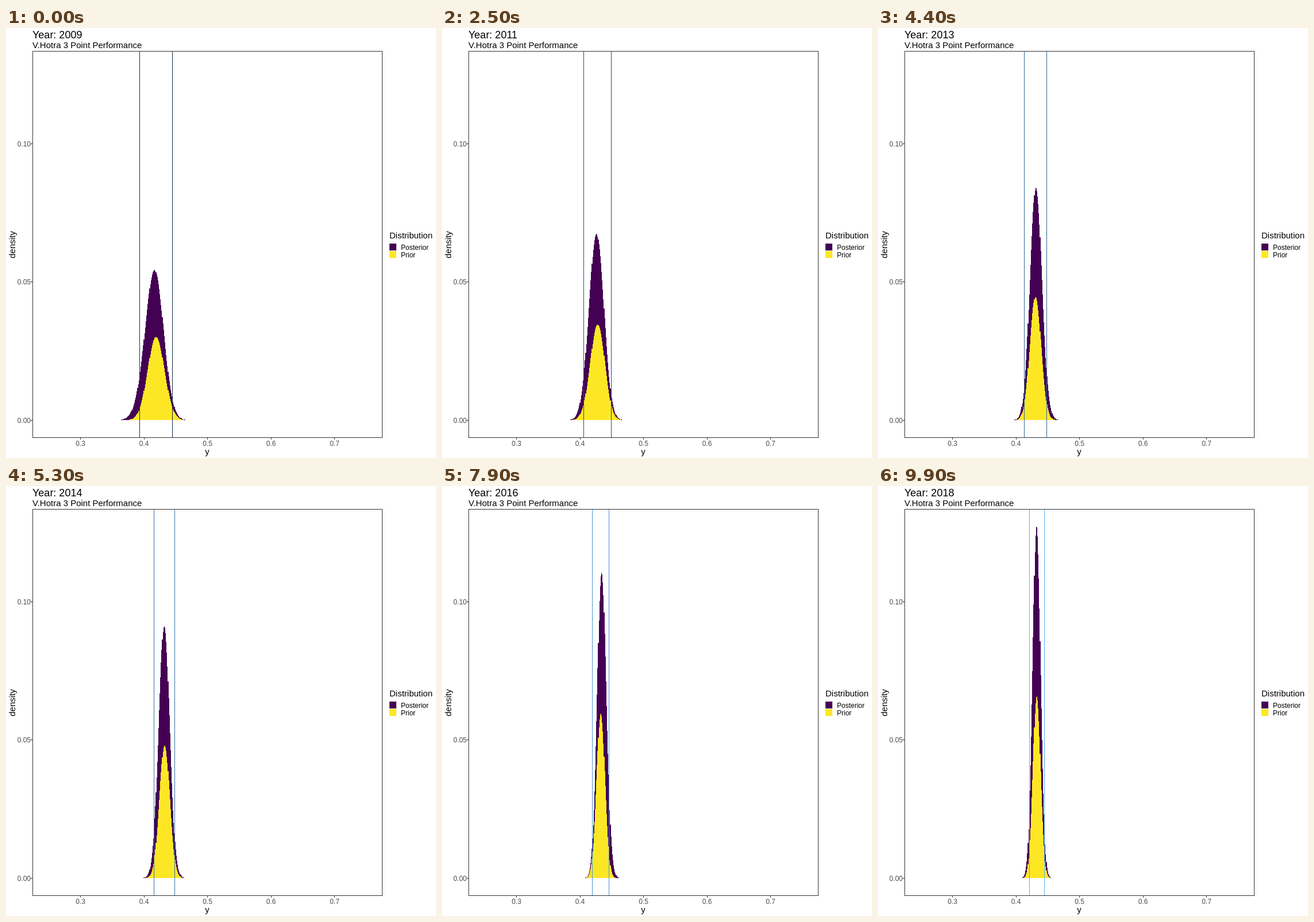
An HTML page that plays this animation: 748x748 px, repeating every 10000 ms.

```html
<!DOCTYPE html>
<html lang="en">
<head>
<meta charset="utf-8">
<title>Yearly shooting estimate</title>
<style>
  html, body { margin: 0; width: 100%; height: 100%; overflow: hidden; background: #fff; }
  svg { display: block; width: 100vw; height: 100vh; }
  text { font-family: "Liberation Sans", Arial, sans-serif; font-size: 15px; fill: #000; }
  .title { font-size: 18px; }
  .small { font-size: 12px; }
  .tick { font-size: 12px; fill: #4d4d4d; }
  .mid { text-anchor: middle; }
  .end { text-anchor: end; }
  .crisp { shape-rendering: crispEdges; }
</style>
</head>
<body>
<svg viewBox="0 0 748 748">
  <rect width="748" height="748" fill="#fff"/>
  <text class="title" id="year" x="46" y="18"></text>
  <text x="46" y="35">V.Hotra 3 Point Performance</text>

  <g class="crisp">
    <path id="posterior" fill="#440154"/>
    <path id="prior" fill="#fde725"/>
    <path id="interval" fill="none"/>
    <rect x="46.5" y="40.5" width="608" height="672" fill="none" stroke="#333"/>
    <path id="ticks" stroke="#333"/>
    <rect x="667" y="375" width="12" height="12" fill="#440154"/>
    <rect x="667" y="388" width="12" height="12" fill="#fde725"/>
  </g>

  <g id="labels"></g>
  <text class="mid" x="350" y="742">y</text>
  <text class="mid" transform="translate(16 377) rotate(-90)">density</text>
  <text x="667" y="366">Distribution</text>
  <text class="small" x="687" y="386">Posterior</text>
  <text class="small" x="687" y="399">Prior</text>
</svg>
<script>
const FRAME_MS = 100, FRAMES = 100, STEPS_PER_YEAR = 11, FIRST_YEAR = 2009;
const GRID = 0.001, BASE = 682.2;
const el = id => document.getElementById(id);
const px = v => 129.5 + 1105 * (v - 0.3);
const py = d => BASE - 4805 * d;
const lerp = (a, b, t) => a + (b - a) * t;

// Shots made and taken per season, added to a starting belief.
const seasons = [[166, 380], [151, 342], [55, 121], [272, 600], [261, 615],
                 [286, 646], [402, 887], [324, 789], [212, 501], [354, 810]];
const beliefs = [belief(414, 1004)];
let made = 414, taken = 1004;
for (const [m, n] of seasons) beliefs.push(belief(made += m, taken += n));

function belief(hits, n) {
  const mean = hits / n;
  return { n, mean, sd: Math.sqrt(mean * (1 - mean) / n) };
}

// Beta curve scaled to the mass of one grid cell.
function mass({ n, mean, sd }, v) {
  const log = mean * Math.log(v / mean) + (1 - mean) * Math.log((1 - v) / (1 - mean));
  return GRID / (sd * Math.sqrt(2 * Math.PI)) * Math.exp(n * log);
}

function bars(height) {
  let d = `M${px(0.3295)} ${BASE}`;
  for (let i = 330; i <= 500; i++) {
    const v = i * GRID;
    d += `V${py(height(v)).toFixed(2)}H${px(v + GRID / 2).toFixed(2)}`;
  }
  return d + `V${BASE}Z`;
}

function drawAxes() {
  let ticks = '', labels = '';
  for (let i = 3; i <= 7; i++) {
    const x = px(i / 10);
    ticks += `M${Math.floor(x) + 0.5} 713v3`;
    labels += `<text class="tick mid" x="${x}" y="727">0.${i}</text>`;
  }
  for (const d of [0, 0.05, 0.1]) {
    const y = Math.floor(py(d));
    ticks += `M43 ${y + 0.5}h3`;
    labels += `<text class="tick end" x="43" y="${y + 5}">${d.toFixed(2)}</text>`;
  }
  el('ticks').setAttribute('d', ticks);
  el('labels').innerHTML = labels;
}

function draw(frame) {
  const pos = frame / STEPS_PER_YEAR;
  const k = Math.min(Math.floor(pos), seasons.length - 2);
  const t = pos - k;
  const [before, now, next] = beliefs.slice(k, k + 3);
  const lower = v => lerp(mass(now, v), mass(next, v), t);
  const upper = v => lerp(mass(before, v), mass(now, v), t);

  el('year').textContent = `Year: ${FIRST_YEAR + Math.round(pos)}`;
  el('posterior').setAttribute('d', bars(v => lower(v) + upper(v)));
  el('prior').setAttribute('d', bars(lower));

  const bound = z => Math.floor(px(lerp(now.mean + z * now.sd, next.mean + z * next.sd, t))) + 0.5;
  el('interval').setAttribute('d', `M${bound(-1.96)} 41V712M${bound(1.96)} 41V712`);
  const dark = [19, 43, 67], light = [86, 177, 247];
  const rgb = dark.map((c, i) => Math.round(lerp(c, light[i], pos / 9)));
  el('interval').setAttribute('stroke', `rgb(${rgb})`);
}

let shown = -1;
function tick() {
  const frame = Math.floor(performance.now() / FRAME_MS) % FRAMES;
  if (frame !== shown) draw(shown = frame);
  requestAnimationFrame(tick);
}

drawAxes();
tick();
</script>
</body>
</html>
```
